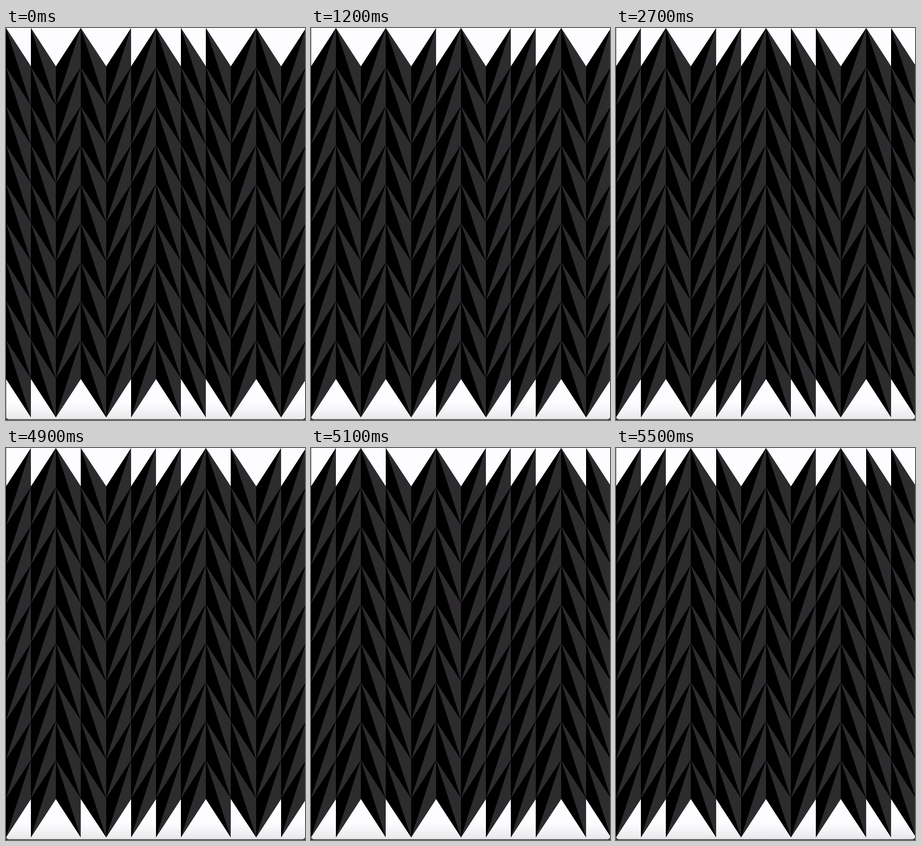
These frames come from a looping animation (600x786 px, 8400 ms). An HTML page with a canvas:

```html
<!DOCTYPE html>
<html lang="en">
<head>
<meta charset="utf-8">
<title>Folded columns</title>
<style>
  html, body { margin: 0; width: 100%; height: 100%; overflow: hidden; background: #fdfcff; }
  canvas { display: block; }
</style>
</head>
<body>
<canvas id="stage" width="600" height="786"></canvas>
<script>
const ctx = document.getElementById('stage').getContext('2d');
const W = 600, H = 786, LOOP = 8400;
const COL = 50.15, STEP = 78.2, DROP = 77, TILES = 9;

// Start time and the slope of each column: U rises to the right, D falls.
const STEPS = [
  [0,    'DDUDUUDDDUDU'],
  [500,  'UUDDDUUUDUDD'],
  [1200, 'UDUDUUDUUUDU'],
  [2700, 'UUDUUUDDDUDD'],
  [4400, 'DUDDUUUUDUUU'],
  [4900, 'UUDDUUUUDDUU'],
  [5100, 'UUDDUDUUUUDD'],
  [5200, 'UUUDUDUUUDDD'],
  [5400, 'DUUDDUDUUDDU'],
  [5500, 'UUUDDUDUUDDD']
];

function gradient(x0, y0, x1, y1, from, to) {
  const g = ctx.createLinearGradient(x0, y0, x1, y1);
  g.addColorStop(0, from);
  g.addColorStop(1, to);
  return g;
}

const paper = gradient(0, 752, 0, 784, '#fdfcff', '#e9e8ea');
const grey = gradient(570, 0, 600, 0, '#2d2b2e', '#2d2d29');

function poly(fill, ...points) {
  ctx.beginPath();
  points.forEach(([x, y]) => ctx.lineTo(x, y));
  ctx.fillStyle = fill;
  ctx.fill();
}

function drawColumn(i, rising) {
  const l = Math.round(i * COL), r = Math.round((i + 1) * COL);
  const left = rising ? DROP : 0, right = DROP - left;
  const len = STEP * TILES;
  poly('#000', [l, left], [r, right], [r, right + len], [l, left + len]);
  for (let k = 0; k < TILES; k++) {
    const a = left + k * STEP, b = right + k * STEP;
    if (rising) poly(grey, [r, b], [r, b + STEP], [l, a + STEP]);
    else poly(grey, [l, a], [r, b], [r, b + STEP]);
  }
}

function drawPaper() {
  ctx.fillStyle = '#3a393b';
  ctx.fillRect(0, 0, W, H);
  ctx.fillStyle = paper;
  ctx.beginPath();
  ctx.roundRect(0.5, -10, W - 0.5, 794.5, 5);
  ctx.fill();
}

let shown = '';
function frame(now) {
  const t = now % LOOP;
  const slopes = STEPS.findLast(([start]) => start <= t)[1];
  if (slopes !== shown) {
    shown = slopes;
    drawPaper();
    [...slopes].forEach((s, i) => drawColumn(i, s === 'U'));
  }
  requestAnimationFrame(frame);
}
frame(0);
</script>
</body>
</html>
```
